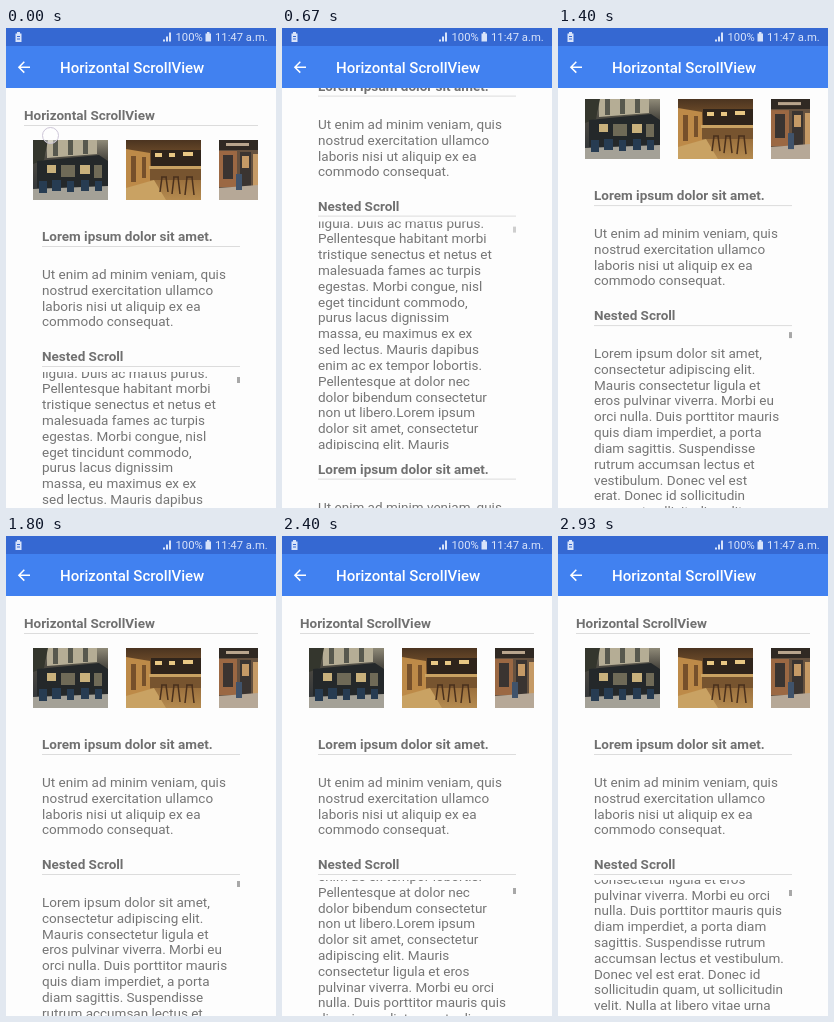
Recreate the animation shown at these times as an HTML page. Size 270 by 480 pixels, loop 2.99 s.

```html
<!DOCTYPE html>
<html lang="en">
<head>
<meta charset="utf-8">
<title>Horizontal ScrollView</title>
<style>
html, body { margin: 0; width: 100%; height: 100%; overflow: hidden; background: #fdfdfd; }
#stage { position: relative; width: 270px; height: 480px; overflow: hidden; background: #fdfdfd;
  font: 13.5px/15.82px Roboto, sans-serif; color: #757575; }
#stage div, #stage svg { position: absolute; }
#page { left: 0; top: 0; width: 270px; height: 703px; }
.text { left: 36px; white-space: pre; }
h2 { position: absolute; margin: 0; left: 36px; width: 198px; height: 17px; font: inherit; font-weight: 700;
  white-space: pre; border-bottom: 1px solid #dcdcdc; color: #707070; }
#nest { left: 36px; top: 344px; width: 198px; height: 228px; overflow: hidden; }
#lines { left: 0; top: 15px; white-space: pre; }
#thumb { left: 195px; width: 3px; height: 6px; background: #a8a8a8; }
#touch { left: -9px; top: -9px; width: 15px; height: 15px; border: 1.5px solid #cdc6d8; border-radius: 50%;
  background: rgba(255, 255, 255, .45); }
#bar { left: 0; top: 0; }
</style>
</head>
<body>
<div id="stage">
  <div id="page">
    <h2 style="left:18px;top:80px;width:234px">Horizontal ScrollView</h2>
    <svg style="left:0;top:112px" width="252" height="60">
      <defs>
        <linearGradient id="wood" x2="0" y2="1">
          <stop stop-color="#4b3420"/><stop offset=".45" stop-color="#8a5f31"/><stop offset="1" stop-color="#b58b50"/>
        </linearGradient>
        <linearGradient id="street" x2="0" y2="1">
          <stop stop-color="#8f8a78"/><stop offset=".3" stop-color="#4d4a42"/><stop offset="1" stop-color="#2b3036"/>
        </linearGradient>
      </defs>
      <svg x="27" width="75" height="60">
        <path fill="url(#street)" d="M0 0h75v60H0z"/>
        <path fill="#b5ad95" d="M14 0h50v14l-50 4z"/>
        <path fill="#57584e" d="M20 0h5v16h-5zM35 0h5v15h-5zM50 0h5v14h-5z"/>
        <path fill="#34362d" d="M0 0h15l-4 20-11 4z"/>
        <path fill="#24282a" d="M4 21l62-6 9 6v27H4z"/>
        <path fill="#c9b17c" d="M14 25h9v8h-9zM47 25h10v9H47z"/>
        <path fill="#6f6a57" d="M28 25h14v12H28zM61 25h8v13h-8z"/>
        <path fill="#a4a197" d="M0 49l75-3v14H0z"/>
        <path fill="#273c52" d="M6 41h8v12H6zM19 40h9v11h-9zM34 41h7v11h-7zM48 40h8v11h-8zM62 41h7v10h-7z"/>
      </svg>
      <svg x="120" width="75" height="60">
        <path fill="url(#wood)" d="M0 0h75v60H0z"/>
        <path fill="#2f241b" d="M25 10h50v16H25z"/>
        <path fill="#bd8a48" d="M0 9l24 4v29L0 49z"/>
        <path fill="#76502b" d="M5 16h5v26H5zM16 17h4v21h-4z"/>
        <path fill="#e8c784" d="M29 13h7v4h-7zM43 13h6v4h-6zM57 12h10v4H57z"/>
        <path fill="#77542f" d="M24 28h51v12H24z"/>
        <path fill="#c9a263" d="M23 26h52v3H23zM0 48l28-8 12 20H0z"/>
        <path stroke="#4a301c" stroke-width="1.5" fill="none"
          d="M35 37h6m-5 0l-2 15m6-15l2 15M47 37h6m-5 0l-2 17m6-17l2 17M60 37h7m-6 0l-2 18m7-18l2 18"/>
      </svg>
      <svg x="213" width="39" height="60">
        <path fill="#65513f" d="M0 0h39v60H0z"/>
        <path fill="#302923" d="M0 0h39v10H0z"/>
        <path fill="#b9a58d" d="M7 3h23v3H7z"/>
        <path fill="#9b6843" d="M0 11h18v36H0z"/>
        <path fill="#3a3431" d="M4 15h10v24H4zM21 12h11v35H21z"/>
        <path fill="#c59a66" d="M23 16h7v12h-7zM34 14h5v32h-5z"/>
        <path fill="#b6a897" d="M0 48l39-3v15H0z"/>
        <path fill="#40536b" d="M17 34h6v16h-6z"/>
      </svg>
    </svg>
    <h2 style="top:201px">Lorem ipsum dolor sit amet.</h2>
    <div class="text para" style="top:239px"></div>
    <h2 style="top:321px">Nested Scroll</h2>
    <div id="nest"><div id="lines"></div><div id="thumb"></div></div>
    <h2 style="top:584px">Lorem ipsum dolor sit amet.</h2>
    <div class="text para" style="top:622px"></div>
  </div>
  <svg id="bar" width="270" height="60" fill="#fff">
    <path fill="#4181f0" d="M0 0h270v60H0z"/>
    <path fill="#3568d2" d="M0 0h270v18H0z"/>
    <text x="54" y="45" font-size="15" font-weight="500">Horizontal ScrollView</text>
    <path d="M13 39.2h11M18.300 33.800l-5.400 5.400 5.400 5.400" fill="none" stroke="#fff" stroke-width="1.500"/>
    <g fill="#d8e3fa" font-size="11.25">
      <text x="169.500" y="13">100%</text>
      <text x="209" y="13">11:47 a.m.</text>
      <path d="M157 13.500v-2h2v2zM160 13.500v-5h2v5zM163 13.500v-9h2v9zM199.500 5.500h1.500v-1.500h2.500v1.500h1.500v8h-5.500z"/>
      <path d="M9.500 5.500h1.500v-1.500h3v1.500h1.500v8.500h-6z"/>
      <path fill="#3568d2" d="M11 8h3v1h-3zM11 10.500h3v1h-3z"/>
    </g>
  </svg>
  <div id="touch"></div>
</div>
<script>
const $ = id => document.getElementById(id);

const para = `Ut enim ad minim veniam, quis
nostrud exercitation ullamco
laboris nisi ut aliquip ex ea
commodo consequat.`;
const opening = `Lorem ipsum dolor sit amet,
consectetur adipiscing elit.
Mauris consectetur ligula et
eros pulvinar viverra. Morbi eu
orci nulla. Duis porttitor mauris
quis diam imperdiet, a porta
diam sagittis. Suspendisse
rutrum accumsan lectus et
vestibulum. Donec vel est
erat. Donec id sollicitudin
quam, ut sollicitudin velit.
Nulla at libero vitae urna
`;
const cycle = `fringilla porttitor sit amet vitae
ligula. Duis ac mattis purus.
Pellentesque habitant morbi
tristique senectus et netus et
malesuada fames ac turpis
egestas. Morbi congue, nisl
eget tincidunt commodo,
purus lacus dignissim
massa, eu maximus ex ex
sed lectus. Mauris dapibus
enim ac ex tempor lobortis.
Pellentesque at dolor nec
dolor bibendum consectetur
non ut libero.Lorem ipsum
dolor sit amet, consectetur
adipiscing elit. Mauris
consectetur ligula et eros
pulvinar viverra. Morbi eu orci
nulla. Duis porttitor mauris quis
diam imperdiet, a porta diam
sagittis. Suspendisse rutrum
accumsan lectus et vestibulum.
Donec vel est erat. Donec id
sollicitudin quam, ut sollicitudin
velit. Nulla at libero vitae urna
`;
document.querySelectorAll('.para').forEach(p => p.textContent = para);
$('lines').textContent = opening + cycle.repeat(2);

// Piecewise linear track of [time, value] pairs.
function track(t, keys) {
  const i = keys.findIndex(k => k[0] > t);
  if (i < 0) return keys[keys.length - 1][1];
  if (i === 0) return keys[0][1];
  const [t0, a] = keys[i - 1], [t1, b] = keys[i];
  return a + (b - a) * (t - t0) / (t1 - t0);
}

const LOOP = 2990, STEP = 66.4, STEPS = 45, RELEASE = 2191;
const pageKeys = [[330, 0], [400, 6], [465, 24], [530, 60], [600, 112], [700, 172], [800, 208], [920, 223],
  [1130, 223], [1200, 180], [1300, 98], [1394, 41], [1500, 14], [1600, 4], [1700, 0]];
const nestKeys = [[1000, 227], [1070, 150], [1200, 0], [1870, 0], [1940, 12], [2000, 40], [2070, 92],
  [2130, 146], [RELEASE, 205]];

const pageScroll = t => track(t, pageKeys);
const nestScroll = t => t > RELEASE
  ? 205 + 268 * (1 - Math.exp((RELEASE - t) / 200))
  : track(t, nestKeys);

function touchAt(t) {
  if (t < 640) return {
    x: track(t, [[0, 45], [330, 8], [465, 6], [640, 3]]),
    y: t < 330 ? track(t, [[0, 108], [330, 271]]) : 271 - pageScroll(t),
    alpha: track(t, [[540, 1], [640, 0]])
  };
  return {
    x: track(t, [[1870, 72], [RELEASE, 61]]),
    y: 429 - Math.min(nestScroll(t), 205),
    alpha: t < 1870 ? 0 : track(t, [[2130, 1], [RELEASE, .75], [2260, 0]])
  };
}

function draw(now) {
  const t = Math.min(Math.floor(now % LOOP / STEP), STEPS - 1) * STEP;
  const n = nestScroll(t), touch = touchAt(t);
  $('page').style.transform = `translateY(${-pageScroll(t)}px)`;
  $('lines').style.transform = `translateY(${-n}px)`;
  $('thumb').style.top = 0.5 + n * .0195 + 'px';
  $('thumb').style.opacity = track(t, [[550, 1], [800, 0], [990, 0], [1060, 1]]);
  $('touch').style.transform = `translate(${touch.x}px, ${touch.y}px)`;
  $('touch').style.opacity = touch.alpha;
}

const start = performance.now();
function frame() {
  draw(performance.now() - start);
  requestAnimationFrame(frame);
}
frame();
</script>
</body>
</html>
```
